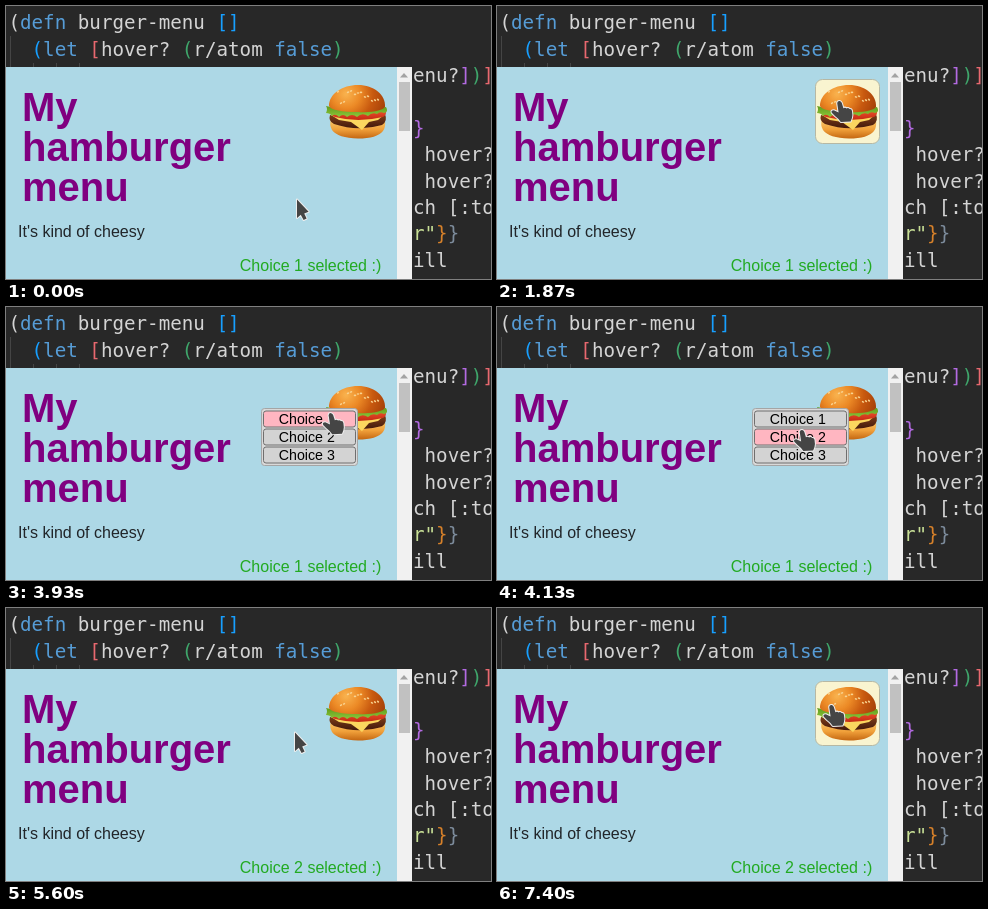
An HTML page with a canvas for the animation above (8 s loop, 485x273 px).

```html
<!DOCTYPE html>
<html lang="en">
<head>
<meta charset="utf-8">
<title>Burger menu</title>
<style>
html, body { margin: 0; width: 100%; height: 100%; overflow: hidden; background: #282828; }
canvas { display: block; }
</style>
</head>
<body>
<canvas id="stage" width="485" height="273"></canvas>
<script>
const c = document.getElementById('stage').getContext('2d');
const LOOP = 8000;
const SANS = '"Liberation Sans", Arial, sans-serif';
const MONO = '19.2px "DejaVu Sans Mono", monospace';
const COL = 11.56, ROW = 26.35;
const WHITE = '#d4d4d4', BLUE = '#569cd6', SKY = '#179fff', RED = '#e8686f',
      GREEN = '#3fa66b', PURPLE = '#b36ae2', STRING = '#c8df96', ORANGE = '#d7812a', STEEL = '#7d8c9c';

// Code rows: row, first column, then text and colour pairs
const code = [
  [0, 0, '(', WHITE, 'defn', BLUE, ' burger-menu ', WHITE, '[]', SKY],
  [1, 2, '(', SKY, 'let', BLUE, ' ', WHITE, '[', RED, 'hover? ', WHITE, '(', GREEN,
    'r/atom ', WHITE, 'false', BLUE, ')', GREEN],
  [2, 35, 'enu?', WHITE, ']', PURPLE, ')', GREEN, ']', RED],
  [4, 35, '}', PURPLE],
  [5, 36, 'hover?', WHITE],
  [6, 36, 'hover?', WHITE],
  [7, 35, 'ch [:to', WHITE],
  [8, 35, 'r"', STRING, '}', ORANGE, '}', STEEL],
  [9, 35, 'ill', WHITE]
];

function text(s, x, y, font, color) {
  c.font = font;
  c.fillStyle = color;
  c.fillText(s, x, y);
}

function rect(x, y, w, h, color) {
  c.fillStyle = color;
  c.fillRect(x, y, w, h);
}

function box(x, y, w, h, r, fill, line) {
  c.beginPath();
  c.roundRect(x, y, w, h, r);
  c.fillStyle = fill;
  c.fill();
  c.strokeStyle = line;
  c.lineWidth = 1;
  c.stroke();
}

function shape(d, fill) {
  c.fillStyle = fill;
  c.fill(new Path2D(d));
}

function blend(g, colors) {
  colors.forEach((col, i) => g.addColorStop(i / (colors.length - 1), col));
  return g;
}

const shade = (y0, y1, ...colors) => blend(c.createLinearGradient(0, y0, 0, y1), colors);
const glow = (x, y, r, ...colors) => blend(c.createRadialGradient(x, y, 1, x, y, r), colors);

function editor() {
  rect(0, 0, 485, 273, '#282828');
  rect(4, 30, 1, 31, '#454545');
  for (let x = 27; x < 80; x += 23) rect(x, 57, 1, 4, '#454545');
  for (const [row, col, ...parts] of code) {
    const y = Math.round(23.4 + ROW * row);
    let at = col;
    for (let i = 0; i < parts.length; i += 2) {
      for (const ch of parts[i]) text(ch, 2.4 + COL * at++, y, MONO, parts[i + 1]);
    }
  }
}

function page(choice) {
  rect(0, 61, 391, 212, '#add8e6');
  rect(391, 61, 15, 212, '#f1f1f1');
  rect(393, 76, 11, 49, '#c1c1c1');
  shape('M394 71.5L398 67L402 71.5Z', '#a3a3a3');
  ['My', 'hamburger', 'menu'].forEach((s, i) =>
    text(s, 16, 115 + 40 * i, 'bold 40px ' + SANS, '#800080'));
  text("It's kind of cheesy", 12, 231, '16px ' + SANS, '#212529');
  text(`Choice ${choice} selected :)`, 233.8, 265, '16px ' + SANS, '#22aa22');
}

function burger() {
  // bottom bun, patty, cheese, tomato, lettuce, top bun
  shape('M325 113Q351 124 379 114Q380 121 377 125Q371 132.5 352 132.5Q332 132 326 124Q323 119 325 113Z',
    shade(114, 133, '#f9c668', '#f0a03a', '#c2640f'));
  shape('M324 109Q351 116 379 108Q382 115 376 119Q352 126 328 118Q322 115 324 109Z',
    shade(110, 122, '#7a3a17', '#42190c'));
  shape('M325 109L379 108L372 114L363 116L356 124L345 116L333 114Z', '#fbd65f');
  shape('M324 105Q351 110 380 104Q381 109 377 111Q352 117 329 111Q324 109 324 105Z',
    shade(104, 114, '#f0502c', '#c32a14'));
  shape('M320 100Q350 107 380 101Q383 106 378 107Q374 105 371 108Q366 106 362 110Q356 106 351 111Q346 107 341 111Q337 107 333 111Q329 107 326 110Q324 107 320 107Q322 103 320 100Z',
    shade(100, 111, '#5f9c1c', '#8cc63a'));
  shape('M323 100C323 88 336 79 352 79C368 79 380 89 379 101C377 104 367 107 352 106C336 106 325 104 323 100Z',
    glow(340, 88, 40, '#f8b04c', '#ec8a26', '#c8590f', '#a8430a'));
  for (let i = 0; i < 13; i++) {
    const x = 332 + (i * 17) % 41;
    const y = 83 + (i * 5) % 13 + Math.abs(x - 352) * 0.13;
    c.beginPath();
    c.ellipse(x, y, 1.3, 0.8, (x - 352) / 25, 0, 7);
    c.fillStyle = '#f9d390';
    c.fill();
  }
}

function menu(hot) {
  box(255.5, 101.5, 96, 57, 3, '#d9d9d9', '#a5a5a5');
  for (let i = 0; i < 3; i++) {
    box(257.5, 104 + 18 * i, 92, 16, 2.5, i === hot ? '#ffb6c1' : '#d3d3d3', '#6f6f6f');
    text('Choice ' + (i + 1), 272.8, 117 + 18 * i, '14.2px ' + SANS, '#000');
  }
}

const ARROW = new Path2D('M1 0.5L1 19L4.8 15.8L7.6 21L10.6 19.6L8.2 14.4L12.6 12.8Z');
const HAND = new Path2D('M-2.8 2Q-2.4 -.3 -.3 0Q1.3 .3 1.8 2L3.4 7.2Q5 6 6.6 7.4Q8.2 6.5 9.6 8Q11.6 7.6 12 10L12.4 14Q12.4 17 10.6 20.5L.8 21Q-1.5 17.5 -5 15L-8.2 11.8Q-9.4 9.2 -6.2 9.2L-1.4 11.4Z');

function cursor(x, y, hand) {
  const path = hand ? HAND : ARROW;
  c.save();
  c.translate(x, y);
  c.lineJoin = 'round';
  c.lineWidth = 2;
  c.strokeStyle = '#eee';
  c.stroke(path);
  c.fillStyle = '#454545';
  c.fill(path);
  c.restore();
}

// Pointer moves: start, end, step count, waypoints
const moves = [
  [1400, 1870, 8, [[290, 193], [318, 140], [343, 95]]],
  [3870, 4530, 11, [[343, 95], [313, 114], [299, 131], [290, 125]]],
  [5600, 5600, 1, [[290, 125], [288, 124]]],
  [7000, 7400, 7, [[288, 124], [313, 109], [335, 97]]]
];

function pointer(t) {
  let at = moves[0][3][0];
  for (const [start, end, steps, pts] of moves) {
    if (t < start) break;
    const gap = (end - start) / (steps - 1 || 1);
    const k = gap ? Math.min(steps, Math.floor((t - start) / gap + 0.1) + 1) : steps;
    const p = k / steps;
    const u = p * (1 + 0.5 * p * (1 - p)) * (pts.length - 1);
    const i = Math.min(pts.length - 2, Math.floor(u));
    at = pts[i].map((v, n) => v + (pts[i + 1][n] - v) * (u - i));
  }
  return at;
}

const inside = (x, y, l, t, r, b) => x >= l && x < r && y >= t && y < b;

function draw(t) {
  const [x, y] = pointer(t);
  const open = t >= 2870 && t < 5530;
  const onMenu = open && inside(x, y, 256, 102, 352, 159);
  const onTile = !onMenu && inside(x, y, 319, 74, 383, 138);
  const leaving = t >= 5530 && t < 5600;
  editor();
  page(t < 5530 ? 1 : 2);
  if (onTile) box(318.5, 73.5, 64, 64, 7, '#f9f4d0', '#b6b8a4');
  burger();
  if (open) menu(onMenu ? Math.min(2, Math.floor((y - 103) / 18)) : -1);
  cursor(x, y, onTile || onMenu || leaving);
}

function tick(now) {
  draw(now % LOOP);
  requestAnimationFrame(tick);
}
draw(0);
requestAnimationFrame(tick);
</script>
</body>
</html>
```
